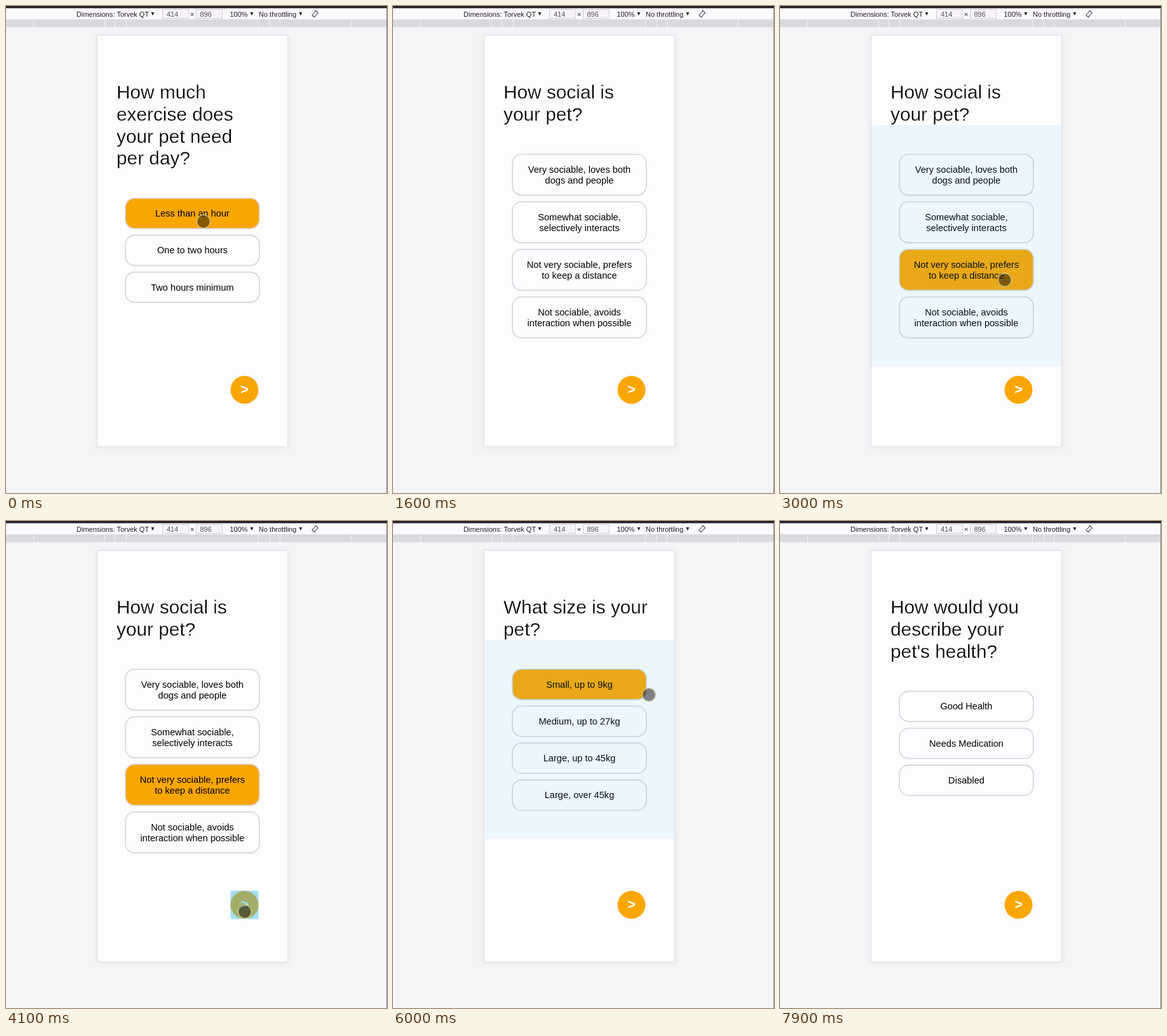
An HTML page that plays this animation: 600 by 768 pixels, repeating every 8 s.

```html
<!DOCTYPE html>
<html lang="en">
<head>
<meta charset="utf-8">
<title>Pet quiz</title>
<style>
  html, body { margin: 0; width: 100%; height: 100%; overflow: hidden; background: #f5f4f7; }
  svg { display: block; font-family: "Liberation Sans", Arial, sans-serif; }
  .bar { font-size: 11px; fill: #201c22; }
  .dim { fill: #55515a; }
  .input { fill: #f6f4f8; stroke: #cfcdd3; }
  /* the thin page-coloured outline lightens the heading's strokes */
  .title { font-size: 29.8px; fill: #000; stroke: #fdfcfe; stroke-width: .35px; }
  .label { font-size: 14.6px; text-anchor: middle; }
  .option { stroke: #d4d3d8; stroke-width: 1.6; }
  .next { font-size: 22px; font-weight: bold; fill: #fff; text-anchor: middle; }
  .tap { fill: #30b8ea; }
  .pointer { fill: #000; fill-opacity: .47; stroke: #e8d8a8; stroke-opacity: .6; stroke-width: 1.8; }
</style>
</head>
<body>
<svg width="600" height="768" viewBox="0 0 600 768">
  <defs>
    <filter id="shadow" x="-10%" y="-10%" width="120%" height="120%">
      <feDropShadow dx="0" dy="1" stdDeviation="5" flood-opacity=".07"/>
    </filter>
  </defs>
  <rect width="600" height="768" fill="#f5f4f7"/>
  <rect width="600" height="21" fill="#fcf9fd"/>
  <rect width="600" height="3.5" fill="#261f29"/>
  <g class="bar">
    <text x="111" y="16.5">Dimensions: Torvek QT</text>
    <rect class="input" x="246.5" y="5.5" width="41" height="14"/>
    <rect class="input" x="299.5" y="5.5" width="41" height="14"/>
    <text class="dim" x="253" y="16.5">414</text>
    <text x="290" y="16.5">×</text>
    <text class="dim" x="305.5" y="16.5">896</text>
    <text x="352.5" y="16.5">100%</text>
    <text x="398" y="16.5">No throttling</text>
    <path d="M228.500 10h5l-2.500 5zM384.500 10h5l-2.500 5zM461.500 10h5l-2.500 5z"/>
  </g>
  <g fill="none" stroke="#5c5860" stroke-width="1.1">
    <rect x="484.5" y="8" width="4.5" height="9" rx="1" transform="rotate(45 486.75 12.5)"/>
    <path d="M486 7.200a5.500 5.500 0 0 1 5.500 4.800M487.500 17.800a5.500 5.500 0 0 1-5.500-4.800"/>
  </g>
  <rect y="21" width="600" height="12.3" fill="#d8dae0"/>
  <path id="ticks" stroke="#f5f4f7"/>
  <rect x="143.5" y="46.5" width="300" height="648.5" fill="#fdfcfe" stroke="#e1e0e4" filter="url(#shadow)"/>
  <g id="page"></g>
  <path d="M599.500 3v765" stroke="#8b8890"/>
</svg>
<script>
const LOOP = 8000, STEP = 100;
const ORANGE = '#faa602';
const BUTTON = [376, 616], EXIT = [560, 598];

const easeInOut = u => u * u * (3 - 2 * u);
const easeIn = u => u * u;
const clamp = v => Math.max(0, Math.min(1, v));

// One sweep of the pointer along a curve pulled towards `bend`.
const sweep = (start, end, from, bend, to, ease = easeInOut) => ({ start, end, from, bend, to, ease });

// tap: an answer is chosen; press: the next button is pressed
const screens = [
  { tap: -LOOP, pick: 0, press: 900,
    title: ['How much', 'exercise does', 'your pet need', 'per day?'],
    options: ['Less than an hour', 'One to two hours', 'Two hours minimum'],
    sweeps: [sweep(0, 900, [311, 340], [600, 725], BUTTON)] },
  { tap: 2900, pick: 2, press: 4000,
    title: ['How social is', 'your pet?'],
    options: ['Very sociable, loves both|dogs and people', 'Somewhat sociable,|selectively interacts',
      'Not very sociable, prefers|to keep a distance', 'Not sociable, avoids|interaction when possible'],
    sweeps: [sweep(2250, 2600, [480, 590], [350, 400], [354, 432]),
      sweep(3000, 4000, [354, 432], [510, 705], BUTTON)] },
  { tap: 5900, pick: 0, press: 6900,
    title: ['What size is your', 'pet?'],
    options: ['Small, up to 9kg', 'Medium, up to 27kg', 'Large, up to 45kg', 'Large, over 45kg'],
    sweeps: [sweep(5100, 6000, [509, 600], [190, 250], [403, 274]),
      sweep(6000, 6900, [403, 274], [620, 560], BUTTON)] },
  { tap: Infinity, pick: -1, press: Infinity,
    title: ['How would you', 'describe your', "pet's health?"],
    options: ['Good Health', 'Needs Medication', 'Disabled'],
    sweeps: [] }
];

// After each press the pointer leaves to the right and the next screen appears.
screens.forEach((s, i) => {
  s.from = i ? screens[i - 1].press + 600 : 0;
  s.sweeps.push(sweep(s.press + 100, s.press + 500, BUTTON, [440, 614], EXIT, easeIn));
});

const page = document.getElementById('page');
document.getElementById('ticks').setAttribute('d',
  [104, 122, 138, 250].map(d => `M${293.5 - d} 22v11M${293.5 + d} 22v11`).join(''));

// Tap highlight: full while held, then fading out
const flash = (t, start, hold) =>
  t < start ? 0 : .44 * clamp(1 - (t - start - hold) / 125);

const tapRect = (x, y, w, h, alpha) => alpha
  ? `<rect class="tap" x="${x}" y="${y}" width="${w}" height="${h}" rx="2" opacity="${alpha}"/>` : '';

function pointer(t, sweeps) {
  const s = sweeps.filter(v => v.start <= t).pop();
  if (!s) return '';
  const u = s.ease(clamp((t - s.start) / (s.end - s.start))), v = 1 - u;
  const [x, y] = [0, 1].map(k => v * v * s.from[k] + 2 * u * v * s.bend[k] + u * u * s.to[k]);
  return `<circle class="pointer" cx="${x}" cy="${y}" r="10.5"/>`;
}

function draw(t) {
  const s = screens.filter(v => v.from <= t).pop();
  const top = 233.8 + (s.title.length - 2) * 34.7;
  const tall = s.options[0].includes('|');
  const height = tall ? 64.6 : 47.8, pitch = tall ? 75 : 58.2;

  let out = s.title.map((line, i) =>
    `<text class="title" x="174" y="${146.3 + i * 34.7}">${line}</text>`).join('');

  s.options.forEach((text, i) => {
    const y = top + i * pitch, lines = text.split('|');
    const fill = i === s.pick && t >= s.tap ? ORANGE : 'none';
    out += `<rect class="option" x="188" y="${y}" width="211" height="${height}" rx="14.5" fill="${fill}"/>`;
    lines.forEach((line, j) => {
      const base = y + height / 2 + 5 + (j - (lines.length - 1) / 2) * 16.8;
      out += `<text class="label" x="293.5" y="${base}">${line}</text>`;
    });
  });

  out += `<circle cx="375.6" cy="605.3" r="22" fill="${ORANGE}"/>
    <text class="next" x="375.6" y="612">&gt;</text>`;
  const panelEnd = top + (s.options.length - 1) * pitch + height + 45.4;
  out += tapRect(144, 188, 299, panelEnd - 188, flash(t, s.tap, 0));
  out += tapRect(353.5, 583, 44, 44.8, flash(t, s.press, 150));
  page.innerHTML = out + pointer(t, s.sweeps);
}

let last = -1;
function tick(now) {
  const t = Math.floor(now % LOOP / STEP) * STEP;
  if (t !== last) draw(last = t);
  requestAnimationFrame(tick);
}
draw(0);
requestAnimationFrame(tick);
</script>
</body>
</html>
```
